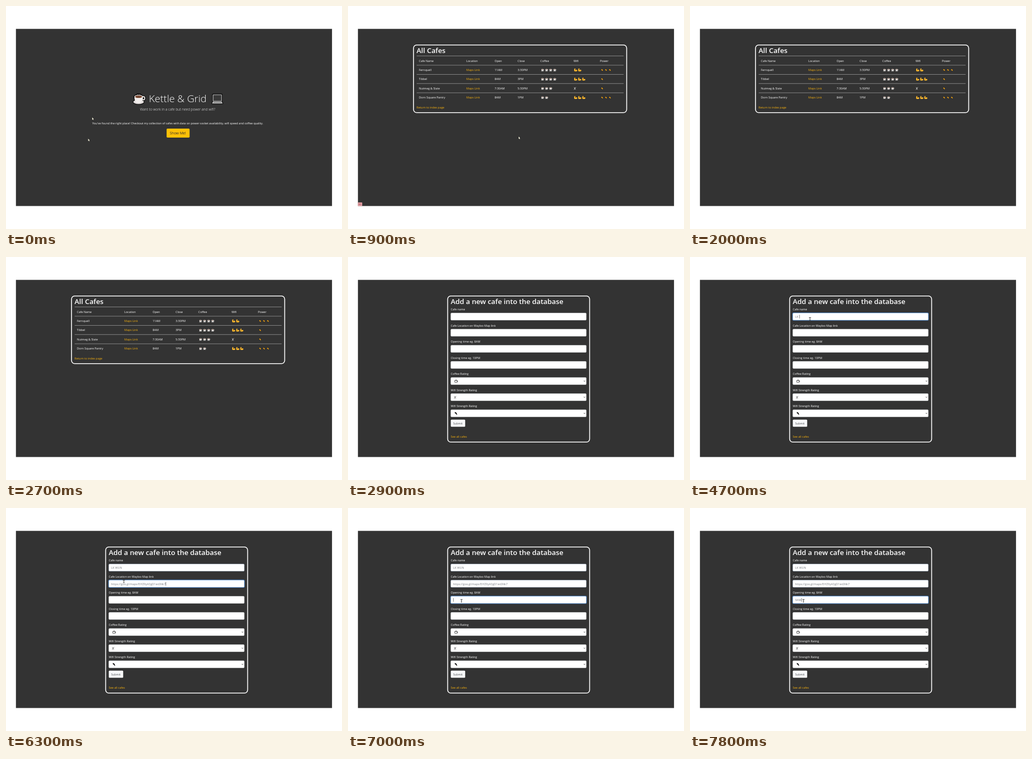
Animation, 636 px wide and 422 px high, one loop 8 s. Source, as an HTML page with a canvas:

```html
<!DOCTYPE html>
<html lang="en">
<head>
<meta charset="utf-8">
<title>Cafe list</title>
<style>
  html, body { margin: 0; width: 100%; height: 100%; overflow: hidden; background: #fff; }
  canvas { display: block; width: 100vw; height: 100vh; }
</style>
</head>
<body>
<canvas id="stage"></canvas>
<script>
const W = 636, H = 422, LOOP = 8000;
const DARK = '#333333', AMBER = '#f5b00f', WHITE = '#ffffff';
const BODY = 5.42, HEADING = 13.3;
const canvas = document.getElementById('stage');
const ctx = canvas.getContext('2d');
const dpr = window.devicePixelRatio || 1;
canvas.width = W * dpr;
canvas.height = H * dpr;

function text(str, x, y, color = WHITE, size = BODY, weight = 400) {
  ctx.font = `${weight} ${size}px "Open Sans", "Noto Sans", sans-serif`;
  ctx.fillStyle = color;
  ctx.fillText(str, x, y);
}

function box(x, y, w, h, r, fill, stroke, line = 1) {
  ctx.beginPath();
  ctx.roundRect(x, y, w, h, r);
  if (fill) { ctx.fillStyle = fill; ctx.fill(); }
  if (stroke) { ctx.strokeStyle = stroke; ctx.lineWidth = line; ctx.stroke(); }
}

function poly(points, fill, stroke, line = 1) {
  ctx.beginPath();
  points.forEach(([x, y], i) => i ? ctx.lineTo(x, y) : ctx.moveTo(x, y));
  ctx.closePath();
  if (stroke) { ctx.strokeStyle = stroke; ctx.lineWidth = line; ctx.lineJoin = 'round'; ctx.stroke(); }
  if (fill) { ctx.fillStyle = fill; ctx.fill(); }
}

function oval(x, y, rx, ry, fill, stroke, line = 1) {
  ctx.beginPath();
  ctx.ellipse(x, y, rx, ry, 0, 0, Math.PI * 2);
  if (stroke) { ctx.strokeStyle = stroke; ctx.lineWidth = line; ctx.stroke(); }
  if (fill) { ctx.fillStyle = fill; ctx.fill(); }
}

function at(x, y, draw) {
  ctx.save();
  ctx.translate(x, y);
  draw();
  ctx.restore();
}

// ---- icons, drawn around their own centre ----

function cupBody(fill, stroke, line) {
  ctx.beginPath();
  ctx.moveTo(-9, -3);
  ctx.bezierCurveTo(-9, 5, -5, 8, -1, 8);
  ctx.bezierCurveTo(4, 8, 7, 4, 7, -3);
  ctx.closePath();
  if (stroke) { ctx.strokeStyle = stroke; ctx.lineWidth = line; ctx.stroke(); }
  if (fill) { ctx.fillStyle = fill; ctx.fill(); }
}

function bigCup() {
  oval(-1, 6, 10, 4, '#111', '#111', 2.4);
  oval(8, -1, 2.6, 3, null, '#111', 4.6);
  cupBody('#111', '#111', 3);
  oval(-1, -4, 8, 3.5, '#111', '#111', 3);
  poly([[-5, -7], [-4, -9.5], [3, -9], [4, -6]], '#111', '#111', 1.5);
  oval(-1, 6, 10, 4, '#e3dedd');
  oval(8, -1, 2.6, 3, null, '#eeeae8', 1.8);
  cupBody('#f3efed');
  oval(-1, -4, 8, 3.3, '#f5f1ef');
  oval(-1, -3.8, 6.6, 2.4, '#75452f');
  ctx.strokeStyle = '#bdb6b2';
  ctx.lineWidth = 0.8;
  ctx.beginPath();
  ctx.moveTo(-2, -5.5);
  ctx.quadraticCurveTo(-4, -7, -2, -8.5);
  ctx.moveTo(1.5, -5.5);
  ctx.quadraticCurveTo(0, -7, 1.5, -8.5);
  ctx.stroke();
}

function laptop() {
  box(-9, -9.3, 18, 14, 1, '#111', '#111', 2);
  poly([[-9, 4], [9, 4], [10.5, 9], [-10.5, 9]], '#111', '#111', 1.5);
  box(-8, -8, 16, 12, 0.8, '#383838', '#c8c8c8', 1.1);
  poly([[-8.3, 5], [8.3, 5], [10, 8.4], [-10, 8.4]], '#c9c9c9');
  poly([[-7, 5.8], [7, 5.8], [7.6, 7], [-7.6, 7]], '#777');
}

function cup() {
  box(-2.3, -0.9, 4.2, 2.6, [0.3, 0.3, 1.6, 1.6], '#f2f0ee');
  oval(2, 0, 0.7, 0.8, null, '#ddd', 0.5);
  oval(-0.2, -1, 2.1, 0.8, '#a58a7c', '#f5f3f1', 0.5);
  oval(-0.2, 1.9, 2.7, 0.5, '#d8d5d3');
}

function muscle() {
  ctx.fillStyle = '#fbb72c';
  ctx.beginPath();
  ctx.moveTo(-2.4, -2.8);
  ctx.lineTo(-0.4, -2.5);
  ctx.lineTo(-0.5, -1.1);
  ctx.lineTo(-1.1, -0.9);
  ctx.lineTo(-0.8, 0.6);
  ctx.bezierCurveTo(0.2, -1.2, 3, -0.7, 3, 1.2);
  ctx.bezierCurveTo(2.6, 3, -1, 3.1, -2.8, 2.3);
  ctx.bezierCurveTo(-3.2, 0.5, -3, -1.2, -2.4, -2.8);
  ctx.fill();
}

function spark() {
  poly([[-0.6, -2], [1, -0.6], [0.8, -0.1], [2, 0.5], [0.5, 1.9], [-0.2, 0.5], [-2, -0.3]],
    '#f5a81c', '#181818', 0.8);
}

function cross(color) {
  ctx.strokeStyle = color;
  ctx.lineCap = 'round';
  ctx.lineWidth = 0.75;
  ctx.beginPath();
  ctx.moveTo(-1.2, -1.8);
  ctx.quadraticCurveTo(-0.1, 0, 1, 1.9);
  ctx.moveTo(1.5, -2);
  ctx.quadraticCurveTo(0, -0.3, -1.4, 2);
  ctx.stroke();
}

function outlineCup() {
  ctx.strokeStyle = '#222';
  ctx.lineWidth = 0.7;
  box(-2.7, -0.9, 5, 3.4, [0.2, 0.2, 1.2, 1.2], null, '#222', 0.7);
  ctx.beginPath();
  ctx.moveTo(-2.7, -0.9);
  ctx.quadraticCurveTo(-0.5, -3.4, 1.6, -2);
  ctx.lineTo(2.3, -0.9);
  ctx.stroke();
  oval(2.5, 0.5, 0.6, 0.8, null, '#222', 0.5);
}

function blackBolt() {
  poly([[-2.4, -2.6], [0.3, -2.1], [2, 0.2], [1.6, 0.7], [2.8, 3], [0.2, 1.5], [-0.2, 0.6], [-1.8, -0.6]], '#111');
}

function repeat(icon, n, x, y, step) {
  for (let i = 0; i < n; i++) at(x + i * step, y, icon);
}

// ---- pages ----

function homePage() {
  at(252, 175.5, bigCup);
  at(400, 176, laptop);
  text('Kettle & Grid', 270.5, 182.3, WHITE, 19, 300);
  text('Want to work in a cafe but need power and wifi?', 253.5, 198, WHITE, 6.65, 300);
  text("You've found the right place! Checkout my collection of cafes with data on " +
    'power socket availability, wifi speed and coffee quality.', 163.3, 224.2);
  box(304, 232, 43.5, 17, 1.8, '#ffc107');
  text('Show Me!', 310, 243.1, '#33302a', 6.8);
}

const COLS = [134.3, 224, 277.5, 321, 364, 427, 477];
const HEADS = ['Cafe Name', 'Location', 'Open', 'Close', 'Coffee', 'Wifi', 'Power'];
const CAFES = [
  ['Fernquell', '11AM', '3:30PM', 4, 2, 3],
  ['Tibbel', '8AM', '3PM', 4, 3, 1],
  ['Nutmeg & Slate', '7:30AM', '5:30PM', 3, 0, 1],
  ['Dorn Square Pantry', '8AM', '1PM', 2, 3, 3]
];

function tablePage() {
  box(124, 73.8, 403.5, 128, 6, null, WHITE, 1.6);
  text('All Cafes', 129.8, 88.8, WHITE, HEADING, 600);
  HEADS.forEach((h, i) => text(h, COLS[i], 105.6));
  ctx.fillStyle = 'rgba(255,255,255,.5)';
  for (let i = 0; i < 5; i++) ctx.fillRect(130, 94.2 + i * 17.4, 391.7, 0.8);
  CAFES.forEach(([name, open, close, coffee, wifi, power], i) => {
    const mid = 121 + i * 17.4, base = mid + 2;
    text(name, COLS[0], base);
    text('Maps Link', COLS[1], base, AMBER);
    text(open, COLS[2], base);
    text(close, COLS[3], base);
    repeat(cup, coffee, 368.3, mid, 7.7);
    if (wifi) repeat(muscle, wifi, 431, mid, 7.7);
    else at(429.5, mid + 0.2, () => cross(WHITE));
    repeat(spark, power, 481, mid + 0.2, 7.4);
  });
  text('Return to index page', 129.8, 193.6, AMBER);
}

const LABELS = ['Cafe name', 'Cafe Location on Wayloo Map link', 'Opening time eg. 8AM',
  'Closing time eg. 10PM', 'Coffee Rating', 'Wifi Strength Rating', 'Wifi Strength Rating'];
const URL_TEXT = 'https://goo.gl/maps/EiYZ9yA3gD1esSNk7';
const FOCUS = [3700, 5900, 6800];
const KEYS = [
  [[4300, 'L'], [4500, 'LK'], [4600, 'LK '], [4900, 'LK W'], [5100, 'LK WU'], [5300, 'LK WUN']],
  [[6200, URL_TEXT]],
  [[7200, '9'], [7400, '9A'], [7600, '9AM']]
];

function typed(keys, t) {
  let value = '';
  for (const [time, str] of keys) if (t >= time) value = str;
  return value;
}

function field(i, t) {
  const y = 106 + i * 30.5;
  const active = i < 3 && t >= FOCUS[i] && !(t >= FOCUS[i + 1]);
  const value = i < 3 ? typed(KEYS[i], t) : '';
  text(LABELS[i], 194.5, y - 4.9);
  if (active) box(194.3, y - 0.2, 257, 13.9, 2, null, '#36659c', 1.5);
  const edge = active ? '#78a9df' : value ? '#a9bfdb' : '#dfe2e5';
  box(194.6, y, 256.4, 13.5, 1.5, WHITE, edge, 0.5);
  text(value, 199, y + 9, '#777b80');
  if (active) {
    ctx.fillStyle = '#333';
    ctx.fillRect(199.4 + ctx.measureText(value).width, y + 3.4, 0.6, 7);
  }
  if (i > 3) {
    ctx.strokeStyle = '#333';
    ctx.lineWidth = 0.9;
    ctx.beginPath();
    ctx.moveTo(446.2, y + 6.1);
    ctx.lineTo(447.6, y + 7.5);
    ctx.lineTo(449, y + 6.1);
    ctx.stroke();
  }
}

function formPage(t) {
  box(188.6, 73.8, 268.8, 276.5, 6, null, WHITE, 1.6);
  text('Add a new cafe into the database', 194.4, 88.8, WHITE, HEADING, 600);
  LABELS.forEach((_, i) => field(i, t));
  at(204.6, 235, outlineCup);
  at(202.7, 265.5, () => cross('#333'));
  at(204.2, 296, blackBolt);
  box(194.6, 307.8, 27.2, 13.5, 1.5, '#f8f9fa');
  text('Submit', 199, 316.8, '#4a4d50');
  text('See all cafes', 194.5, 342, AMBER);
}

// ---- pointer ----

function arrow(x, y) {
  at(x, y, () => poly([[0, 0], [0, 4.6], [1, 3.8], [1.8, 5.3], [2.5, 4.9], [1.8, 3.4], [3, 3.2]],
    '#f4f1dc', '#1c1c1c', 0.5));
}

function beam(x, y) {
  at(x, y, () => {
    ctx.fillStyle = '#444';
    ctx.fillRect(-2, -2.8, 4.2, 0.9);
    ctx.fillRect(-0.4, -2.8, 1, 5.6);
    ctx.fillRect(-1.2, 2.2, 2.6, 0.7);
  });
}

// Stops are [time, x, y]; eased between neighbours.
const HOME_PATH = [[200, 155.5, 251], [600, 323, 247]];
const FORM_PATH = [[3200, 300, 190], [3700, 227, 117], [5600, 227, 117], [5900, 223, 139],
  [6500, 223, 139], [6900, 214.7, 175.5]];

function along(path, t) {
  const next = path.findIndex(p => p[0] > t);
  if (next === 0) return path[0].slice(1);
  if (next < 0) return path[path.length - 1].slice(1);
  const [t0, x0, y0] = path[next - 1], [t1, x1, y1] = path[next];
  const u = (t - t0) / (t1 - t0), k = u * u * (3 - 2 * u);
  return [x0 + (x1 - x0) * k, y0 + (y1 - y0) * k];
}

function draw(t) {
  ctx.setTransform(dpr, 0, 0, dpr, 0, 0);
  ctx.fillStyle = WHITE;
  ctx.fillRect(0, 0, W, H);
  ctx.fillStyle = DARK;
  ctx.fillRect(18.8, 43.3, 598.3, 335.2);

  if (t < 700) homePage();
  else if (t < 2900) tablePage();
  else formPage(t);

  if (t >= 500 && t < 1400) {
    box(18.8, 371.8, 8, 6.7, 0, '#f3a9ae');
    text('htt', 19.6, 377, '#6b3338', 4.4);
  }
  if (t < 300) arrow(163.2, 210.8);
  if (t < 2000) arrow(...along(HOME_PATH, t));
  if (t >= 3200) beam(...along(FORM_PATH, t));
}

function tick() {
  draw(Math.floor(performance.now() % LOOP / 100) * 100);
  requestAnimationFrame(tick);
}
tick();
</script>
</body>
</html>
```
